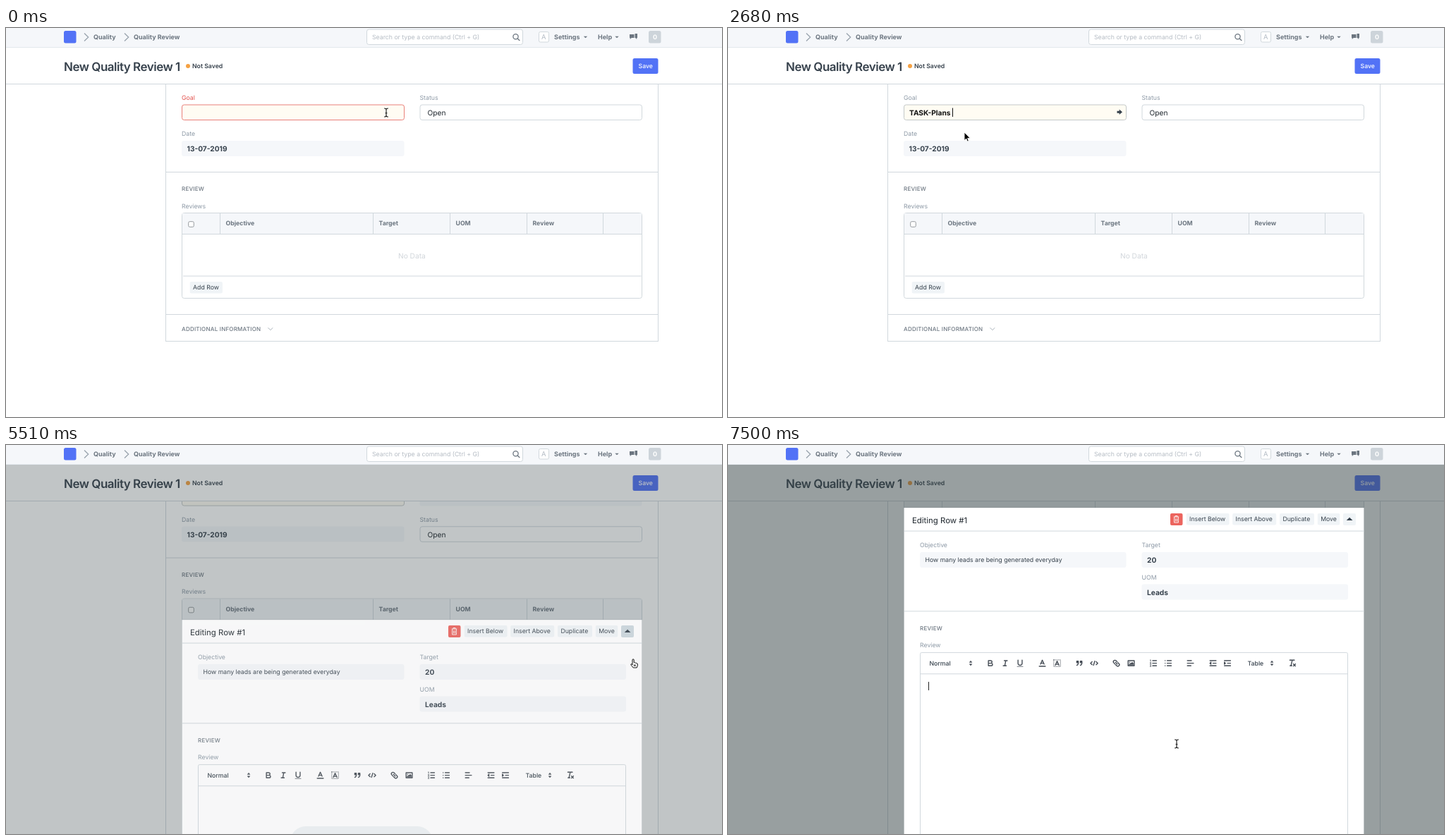
An HTML page for the animation above (8 s loop, 1015 by 552 pixels).

```html
<!DOCTYPE html>
<html lang="en">
<head>
<meta charset="utf-8">
<title>Quality review form</title>
<style>
html, body { margin: 0; width: 100%; height: 100%; overflow: hidden; background: #fff; }
svg { display: block; width: 1015px; height: 552px; }
text { font-family: Inter, "Open Sans", sans-serif; white-space: pre; text-rendering: geometricPrecision; }
.icon { fill: none; stroke: #444b54; stroke-width: 1.9; stroke-linecap: round; stroke-linejoin: round; }
.icon .f { fill: #444b54; }
.icon .s { stroke-width: 1; }
</style>
</head>
<body>
<svg id="stage" viewBox="0 0 1015 552"></svg>
<script>
const INK = '#36414c', GREY = '#8d99a6', MID = '#6c7680', LINE = '#d1d8dd';
const PALE = '#f5f7fa', BTN = '#f0f4f7', BLUE = '#5272f6', LINK = '#3352e0';
const SMALL = 8.73, BIG = 10.18;
const GOAL = 'TASK-Plans', PROCEDURE = 'STD-Plans';

// y is the middle of the capitals
const text = (x, y, s, { size = SMALL, fill = INK, weight = 400, extra = '' } = {}) =>
  `<text x="${x}" y="${y + size * .364}" font-size="${size}" font-weight="${weight}" fill="${fill}" ${extra}>${s}</text>`;
const rect = (x, y, w, h, fill, stroke = 'none', r = 0, extra = '') =>
  `<rect x="${x}" y="${y}" width="${w}" height="${h}" rx="${r}" fill="${fill}" stroke="${stroke}" ${extra}/>`;
const path = (d, stroke, width = 1, fill = 'none', extra = '') =>
  `<path d="${d}" stroke="${stroke}" stroke-width="${width}" fill="${fill}" ${extra}/>`;
const group = (id, body, extra = '') => `<g id="${id}" ${extra}>${body}</g>`;
const label = (x, y, s, fill = GREY) => text(x, y, s, { fill });
const caps = (x, y, s) => text(x, y, s, { size: 8, weight: 500, fill: MID, extra: 'letter-spacing=".22"' });
const bold = (x, y, s, size = BIG) => text(x, y, s, { size, weight: 700 });
const input = (x, y, w) => rect(x, y, w, 21.5, '#fff', LINE, 3);
const locked = (x, y, w) => rect(x, y, w, 22, PALE, 'none', 3);
const button = (x, y, w, s) => rect(x, y, w, 16.5, BTN, 'none', 2) + text(x + 4.4, y + 8.2, s);
const check = y => rect(258.7, y - 3.8, 7.6, 7.6, '#fff', '#8b8f94', 1.8, 'stroke-width=".9"');
const down = (x, y, fill, w = 4.5) => path(`M${x - w},${y - w / 2}h${2 * w}l${-w},${w}z`, 'none', 0, fill);
const lens = (x, y, r, color) =>
  path(`M${x + r},${y}a${r},${r} 0 1 1 ${-2 * r},0a${r},${r} 0 1 1 ${2 * r},0M${x + r * .7},${y + r * .7}l${r * .9},${r * .9}`, color, 1.3);

const COLS = [303.5, 520.5, 629.5, 738.5, 846.5];
const HEADS = ['Objective', 'Target', 'UOM', 'Review'];
const ROWS = [['How many leads are being generated everyday', 20], ['Number of leads qualified', 15],
  ['Leads converted to Opportunities', 10], ['Converted to Customers', 5]];
const columnLines = (y, h) => path(COLS.map(x => `M${x},${y}v${h}`).join(''), LINE);

function nav() {
  const menu = (x, s, tip) => text(x, 13, s, { size: 9, weight: 700, fill: MID }) + down(tip, 13, MID, 2.7);
  const crumb = x => path(`M${x},7.5l5.7,5.5l-5.7,5.5`, '#9aa4ae', 1.3);
  return rect(0, 0, 1015, 27.5, PALE) + path('M0,27.5H1015', '#e3e8ed') +
    rect(82, 4, 17.5, 17.5, BLUE, 'none', 2.5) + crumb(111) + crumb(168) +
    text(124, 13, 'Quality', { size: 9, weight: 700, fill: MID }) +
    text(181, 13, 'Quality Review', { size: 9, weight: 700, fill: MID }) +
    input(511.5, 2, 221) + text(519, 13, 'Search or type a command (Ctrl + G)', { fill: '#b5bcc4' }) +
    lens(722.5, 12.3, 3.6, MID) +
    rect(755.5, 5.5, 14, 14.5, '#fff', LINE, 2) + text(759, 13, 'A', { fill: '#b3bbc4', size: 9.5 }) +
    menu(777, 'Settings', 821.5) + menu(839, 'Help', 866) +
    path('M884,9h6.5v5h-3.8l-2,2v-2h-.7zM891.5,8h3.5v6h-.8v2l-2-2h-.7z', 'none', 0, MID) +
    rect(911, 4, 17.5, 17.5, '#cdd4da', 'none', 2.5) + text(917, 13, '0', { size: 9, weight: 700, fill: '#fff' });
}

function head() {
  return rect(0, 28, 1015, 51.5, '#fff') + path('M0,79.5H1015', LINE) +
    text(82, 54.4, 'New Quality Review 1', { size: 17, weight: 600, extra: 'letter-spacing="-.5"' }) +
    '<circle cx="258" cy="54" r="3" fill="#f5a142"/>' + text(264, 54, 'Not Saved', { weight: 600 }) +
    rect(888.5, 43, 36, 22, BLUE, 'none', 2.5) + text(896.5, 54, 'Save', { weight: 500, fill: '#fff' });
}

function page() {
  const status = group('status', label(586.5, 99, 'Status') + input(587, 109, 314.5) +
    text(597.5, 120, 'Open', { size: BIG, fill: '#1f272e' }));
  const rows = ROWS.map(([name, target], i) => {
    const y = 306.7 + i * 29.5;
    return check(y + 1.5) + text(291.3, y, i + 1) + text(311.5, y, name) + text(528.5, y, target) +
      text(637.5, y, 'Leads') + down(889, y + .7, '#c0c6cc') +
      (i ? path(`M250,${y - 15}H901`, LINE) : '');
  }).join('');
  return rect(226.5, 40, 698, 404.5, '#fff', LINE, 0, 'id="form"') +
    group('goalLabel', text(249, 99, 'Goal')) + rect(249.5, 109, 315, 21.5, '#fffcf3', '#e9807a', 3, 'id="goal"') +
    group('goalValue', text(257, 120, GOAL, { size: BIG, weight: 700, fill: '#111' }) +
      path('M551.5,117.8h3.2v-2.3l4.3,3.8l-4.3,3.8v-2.3h-3.2z', 'none', 0, INK)) +
    path('M0,113.5v12.5', '#111', 1, 'none', 'id="caret"') +
    label(249, 150, 'Date') + locked(249, 160, 315.5) + bold(256.5, 171.5, '13-07-2019') +
    group('procedure', label(586.5, 99, 'Procedure') + locked(586.5, 109, 315) + bold(594, 120, PROCEDURE)) +
    status + path('M227,204.5H924', LINE) + caps(249, 228.5, 'REVIEW') + label(249, 252.5, 'Reviews') +
    rect(249.5, 262.5, 652, 121, '#fff', LINE, 3, 'id="table"') +
    rect(250, 263, 651, 29, PALE) + path('M250,292.5H901', LINE) + columnLines(263, 29.5) + check(278.5) +
    HEADS.map((s, i) => text(COLS[i] + 8, 277, s, { weight: 700, fill: MID })).join('') +
    group('empty', text(556, 323, 'No Data', { size: BIG, fill: '#d1d6db' })) +
    group('rows', columnLines(292.5, 118) + rows) +
    group('foot', path('M251,352H900.5', LINE) + button(260.7, 360, 46.2, 'Add Row') +
      path('M227,406.5H924', LINE) + caps(249, 427, 'ADDITIONAL INFORMATION') +
      path('M371.5,425.3l3.4,3.4l3.4,-3.4', '#a9b2ba', 1)) +
    group('menu', rect(249.5, 131, 315, 80.5, '#fff', '#e3e6e9', 3, 'filter="url(#soft)"') +
      rect(250, 131, 314, 27, '#f0f3f5') + bold(258.5, 144.7, GOAL, SMALL) +
      path('M258.7,171h7M262.2,167.5v7', LINK, 1.6) + text(272, 171, 'Create a new Quality Goal', { fill: LINK }) +
      lens(262, 197.5, 2.7, LINK) + text(273, 198, 'Advanced Search', { fill: LINK }));
}

const PICK = '<path class="f s" d="M7,11L9,13.5L11,11ZM7,7L9,4.5L11,7Z"/>';
const p = (d, cls = '') => `<path class="${cls}" d="${d}"/>`;
const ICONS = [
  [344, PICK], [771, PICK],
  [372, p('M5,4H9.5a2.5,2.5 0 0 1 0,5H5ZM5,9h5.5a2.5,2.5 0 0 1 0,5H5Z')],
  [393, p('M7,4H13M5,14H11M8,14L10,4')],
  [414, p('M5,3V9a4,4 0 0 0 8,0V3') + p('M3.5,15.5H14.5', 's')],
  [445.5, p('M3,15H15') + p('M5.5,11L9,3L12.5,11M11.6,9H6.4')],
  [466.5, p('M5.5,13L9,5L12.5,13M11.6,11H6.4') + '<rect class="s" x="2.5" y="2.5" width="13" height="13" stroke-dasharray="1 2"/>'],
  [498, p('M4,5h3v3h-3zM11,5h3v3h-3z', 'f') + p('M7,8c0,4-3,5-3,5M14,8c0,4-3,5-3,5')],
  [519, p('M5,6L2,9L5,12M13,6L16,9L13,12M10.2,5L7.8,13')],
  [550.5, '<g transform="rotate(45 9 9)">' + p('M8,6H5a3,3 0 0 0 0,6H8M10,6h3a3,3 0 0 1 0,6H10M6.5,9h5') + '</g>'],
  [571.5, '<rect x="3" y="4" width="12" height="10"/>' + p('M5,12V11L7,9L8,10L11,7L13,9V12Z', 'f s') + p('M6,7h.1')],
  [603, p('M7.5,4H15M7.5,9H15M7.5,14H15') + p('M2.6,3L3.6,2.3V5.5M2.5,7.7H4.5L2.5,10.5H4.7M2.5,12.5H4.5L3.5,14L4.5,15.5H2.5', 's')],
  [624, p('M7,4H15M7,9H15M7,14H15M3,4h.1M3,9h.1M3,14h.1')],
  [655.5, p('M3,4H11M3,9H15M3,14H10')],
  [687.5, p('M3,14H15M3,4H15M9,9H15') + p('M5,7V11L3,9Z', 'f')],
  [708, p('M3,14H15M3,4H15M9,9H15') + p('M3,7V11L5,9Z', 'f')],
  [800, p('M4,3H13M8.8,3L6.3,14M4.5,14H8M11,10.5L15,14.5M15,10.5L11,14.5')]
];

function modal() {
  const y = 308.8;
  const trash = path(`M631.8,${y - 3.4}h7.4M634,${y - 3.6}v-1.2h3v1.2M632.6,${y - 3}v7.6h5.8v-7.6M634.5,${y - 1}v4M636.5,${y - 1}v4`, '#fff', .9);
  return rect(249.5, 292.5, 652, 520, '#fff') + text(261, 310, 'Editing Row #1', { size: 11.4, fill: '#1f272e' }) +
    rect(627, y - 8.5, 17.5, 17, '#ec645e', 'none', 2) + trash +
    button(649.7, y - 8.3, 60.8, 'Insert Below') + button(715.2, y - 8.3, 62, 'Insert Above') +
    button(782, y - 8.3, 49, 'Duplicate') + button(835.8, y - 8.3, 31.5, 'Move') +
    rect(872, y - 8.5, 18, 17, BTN, 'none', 2, 'id="close"') + path(`M876.7,${y + 1.7}h8.8l-4.4,-4.4z`, 'none', 0, INK) +
    path('M250,325.5H901.5M250,439.3H901.5', LINE) +
    label(272, 345.5, 'Objective') + locked(272, 355.3, 292.5) + text(279.5, 366, ROWS[0][0]) +
    label(586.5, 345.5, 'Target') + locked(586.5, 355.3, 292.5) + bold(594, 366.5, '20') +
    label(586.5, 390.8, 'UOM') + locked(586.5, 400.8, 292.5) + bold(594, 412.3, 'Leads') +
    caps(272, 463.5, 'REVIEW') + label(272, 487.5, 'Review') +
    rect(272.5, 498, 606, 300, '#fff', LINE, 2) + path('M273,528.2H878', LINE) +
    text(285.5, 513.2, 'Normal', { weight: 500 }) + text(736.5, 513.2, 'Table', { weight: 500 }) +
    ICONS.map(([x, body]) => `<g class="icon" transform="translate(${x - 6.5} 506.5) scale(.727)">${body}</g>`).join('') +
    rect(403, 585.5, 202, 60, '#eef2f5', 'none', 22, 'id="pill"') +
    path('M284.5,539.5v12', '#222', 1, 'none', 'id="noteCaret"');
}

const CURSORS =
  group('ibeam', path('M-2.8,-6q2.8,0 2.8,1.6v8.8q0,1.6 -2.8,1.6M2.8,-6q-2.8,0 -2.8,1.6v8.8q0,1.6 2.8,1.6M-1.4,.8h2.8', '#111', 1.1)) +
  group('arrow', path('M0,0V11.6L2.7,9.1L4.4,13.1L6.3,12.3L4.6,8.4H8.3Z', '#fff', .9, '#000')) +
  group('hand', path('M-2,2V-5a1.1,1.1 0 0 1 2.2,0V-1.2q1.6,-.7 2,.5q1.4,-.5 1.7,.6q1.4,-.3 1.4,1.1V3.2L4.2,6H-.8L-3.9,2.2q-.8,-1.4 .4,-1.6q.8,0 1.5,1.4M.6,1.5V4M2.2,1.5V4', '#111', 1, '#fff', 'stroke-linejoin="round"'));

const stage = document.getElementById('stage');
stage.innerHTML = '<defs><filter id="soft" x="-10%" y="-20%" width="120%" height="150%">' +
  '<feDropShadow dx="0" dy="2.5" stdDeviation="2.5" flood-color="#000" flood-opacity=".2"/></filter></defs>' +
  group('page', page()) + head() + rect(0, 28, 1015, 524, '#334143', 'none', 0, 'id="shade"') +
  nav() + group('modal', modal()) + group('cursor', CURSORS);

const el = {};
stage.querySelectorAll('[id]').forEach(e => el[e.id] = e);
const show = (id, on) => el[id].setAttribute('display', on ? 'inline' : 'none');
const set = (id, name, value) => el[id].setAttribute(name, value);
const move = (id, x, y) => set(id, 'transform', `translate(${x} ${y})`);
const within = (t, ...spans) => spans.some(([a, b]) => t >= a && t < b);

const TRACK = [
  [0, 539, 120, 'ibeam'], [1800, 537.5, 120, 'ibeam'], [1950, 510, 128, 'ibeam'], [2100, 440, 140, 'hand'],
  [2250, 375, 147, 'hand'], [2400, 338, 149, 'hand'], [2550, 335, 148, 'arrow'],
  [3130, 336, 160, 'arrow'], [3280, 343, 215, 'arrow'], [3430, 352.6, 271.8, 'arrow'], [3580, 430, 340, 'arrow'],
  [3730, 560, 367, 'arrow'], [3870, 672, 342, 'arrow'], [4170, 690, 338, 'arrow'], [4320, 730, 329, 'arrow'],
  [4470, 785, 320, 'arrow'], [4620, 840, 314, 'arrow'], [4760, 872, 311, 'arrow'], [4910, 886, 310, 'hand'],
  [5060, 890, 310, 'hand'], [5840, 870, 320, 'arrow'], [6000, 760, 372, 'ibeam'], [6150, 660, 415, 'ibeam'],
  [6310, 636, 424, 'ibeam']
];

function draw(t) {
  const chosen = t >= 2550, loaded = t >= 2690, editing = t >= 5510, settled = t >= 5660;
  const scroll = t >= 5840 ? 203.4 : settled ? 158 : editing ? 44.4 : 0;
  const grow = editing ? 600 : loaded ? 58.3 : 0;

  move('page', 0, -scroll);
  move('modal', 0, -scroll);
  move('foot', 0, grow);
  move('status', 0, loaded ? 51.2 : 0);
  set('form', 'height', 404.5 + grow);
  set('table', 'height', 121 + grow);
  show('empty', !loaded);
  show('rows', loaded && !editing);
  show('procedure', loaded);
  show('goalValue', chosen);
  el.goalLabel.firstChild.setAttribute('fill', chosen ? GREY : '#e2504c');
  set('goal', 'stroke', chosen ? '#c3c8c8' : t >= 440 ? '#e0524c' : '#e9807a');
  set('goal', 'stroke-width', t >= 440 && !chosen ? 1.3 : 1);
  show('caret', within(t, [440, 910], [1360, 1950], [2550, 2830], [3280, 3870], [4470, 5060]));
  move('caret', chosen ? 318.5 : 257.5, 0);
  show('menu', t >= 1360 && !chosen);
  set('menu', 'opacity', t < 1500 ? .5 : 1);

  show('shade', editing);
  set('shade', 'opacity', settled ? .5 : .3);
  show('modal', editing);
  set('modal', 'opacity', settled ? 1 : .88);
  show('pill', !settled);
  set('close', 'fill', t < 5840 ? '#cdd8de' : BTN);
  show('noteCaret', within(t, [6310, 6910], [7500, 8000]));

  const [, x, y, kind] = TRACK.filter(k => k[0] <= t).pop();
  move('cursor', x, y);
  ['ibeam', 'arrow', 'hand'].forEach(k => show(k, k === kind));
}

function tick() {
  draw(performance.now() % 8000);
  requestAnimationFrame(tick);
}
tick();
</script>
</body>
</html>
```
